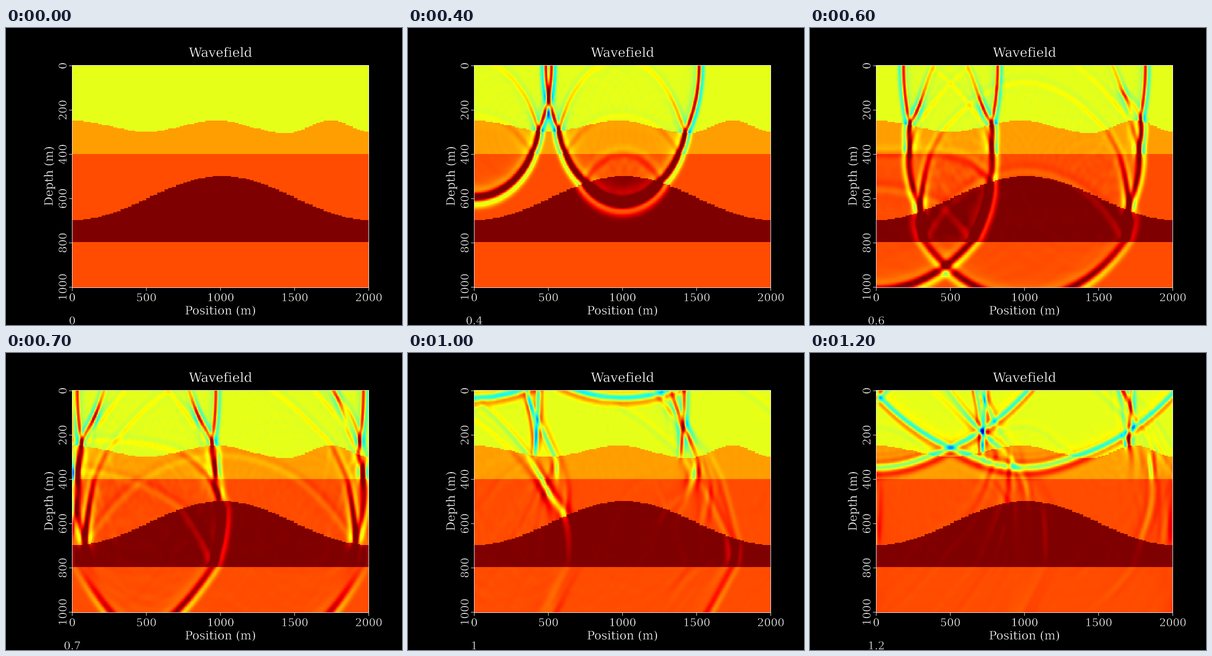
Recreate the animation shown at these times as a matplotlib script. Size 864x648 px, loop 1300 ms.

```python
import numpy as np
import matplotlib.pyplot as plt
from matplotlib.animation import FuncAnimation
from matplotlib.collections import LineCollection
from matplotlib.patheffects import Stroke

W, H, DPI = 864, 648, 100
PX = 72 / DPI
FRAMES, STEP_MS = 13, 100
LEFT, RIGHT, TOP, BOTTOM = 145, 791, 82, 566

# ---------- velocity model ----------
CELL, DT = 5.0, 0.001
NX, NZ = 401, 201
PAD_X, PAD_Z = 100, 140
COLUMN = 25  # width of a model column in metres


def wavy_depth(x):
    """First interface: half cosines between crests and troughs."""
    turns = [0, 490, 967, 1432, 1738, 2000]
    phase = np.pi * np.interp(x, turns, np.arange(6))
    trough = np.where((x > 967) & (x < 1738), 306, 300)
    return 250 + (trough - 250) * (1 - np.cos(phase)) / 2


def build_model():
    x = np.arange(NX) * CELL // COLUMN * COLUMN
    z = np.arange(NZ)[:, None] * CELL
    dome = 600 + 100 * np.cos(np.pi * x / 1000)
    v = np.full((NZ, NX), 1500.0)
    v[z >= wavy_depth(x) - CELL / 2] = 1800
    v[z[:, 0] >= 400] = 2000
    v[z >= dome - CELL / 2] = 2500
    v[z[:, 0] >= 800] = 2000
    return v


# ---------- wave equation ----------
def ricker(t, f=25.0, delay=0.05):
    a = (np.pi * f * (t - delay)) ** 2
    return (1 - 2 * a) * np.exp(-a)


def propagate(model):
    """Fourth-order acoustic modelling with two surface sources."""
    v = np.pad(model, ((PAD_Z, PAD_Z), (PAD_X, PAD_X)), mode="edge")
    c = ((v * DT / CELL) ** 2).astype(np.float32)[2:-2, 2:-2]
    now = np.zeros(v.shape, np.float32)
    old = np.zeros_like(now)
    lap = np.zeros_like(c)
    tmp = np.zeros_like(c)
    near, far = np.float32(4 / 3), np.float32(-1 / 12)
    sources = [PAD_X, PAD_X + NX // 2]
    every = round(STEP_MS / 1000 / DT)
    shots = []
    for n in range(every * (FRAMES - 1) + 1):
        if n % every == 0:
            shots.append(now[PAD_Z:PAD_Z + NZ, PAD_X:PAD_X + NX].copy())
        mid = now[2:-2, 2:-2]
        np.add(now[1:-3, 2:-2], now[3:-1, 2:-2], out=lap)
        lap += now[2:-2, 1:-3]
        lap += now[2:-2, 3:-1]
        lap *= near
        np.add(now[:-4, 2:-2], now[4:, 2:-2], out=tmp)
        tmp += now[2:-2, :-4]
        tmp += now[2:-2, 4:]
        tmp *= far
        lap += tmp
        np.multiply(mid, np.float32(5), out=tmp)
        lap -= tmp
        lap *= c
        lap += mid
        lap += mid
        inner = old[2:-2, 2:-2]
        np.subtract(lap, inner, out=inner)
        old[PAD_Z, sources] += ricker(n * DT)
        now, old = old, now
    return shots


def jet(x):
    x = np.clip(x, 0, 1)[..., None]
    return np.clip(1.5 - np.abs(4 * x - np.array([3, 2, 1])), 0, 1)


model = build_model()
shots = propagate(model)
gain = 0.33 / -shots[2].min()
images = [jet(model / 2500 + gain * s) for s in shots]

# ---------- figure ----------
fig = plt.figure(figsize=(W / DPI, H / DPI), dpi=DPI, facecolor="black")
ax = fig.add_axes([0, 0, 1, 1])
ax.axis("off")
picture = ax.imshow(images[0], extent=(LEFT, RIGHT, BOTTOM, TOP),
                    interpolation="nearest", aspect="auto")


def label(text, x, y, size=23.3, rotation=0):
    """Thin serif text centred on its baseline; size in pixels."""
    return ax.text(x, y, text, color="white", family="DejaVu Serif",
                   size=size * PX, ha="center", va="baseline",
                   rotation=rotation, rotation_mode="anchor",
                   path_effects=[Stroke(linewidth=0.5 * PX,
                                        foreground="black")])


label("Wavefield", 468, 63, 28)
label("Position (m)", 468, 625, 25.5)
label("Depth (m)", 102, 323, 25.5, 90)
clock = label("", 144.5, 646.5)

x0, x1, y0, y1 = LEFT - 0.5, RIGHT + 0.5, TOP - 0.5, BOTTOM + 0.5
rules = [[(x0, y0), (x1, y0), (x1, y1), (x0, y1), (x0, y0)]]
for i, x in enumerate(np.linspace(x0, x1, 5)):
    label(str(500 * i), x, 596)
    rules.append([(x, y1), (x, y1 + 7)])
for i, y in enumerate(np.linspace(TOP + 0.5, BOTTOM - 0.5, 6)):
    label(str(200 * i), 132, y, rotation=90)
    rules.append([(x0 - 7, y), (x0, y)])
frame = LineCollection(rules, colors="white", linewidths=PX)
frame.set_snap(False)
ax.add_collection(frame)
ax.set(xlim=(0, W), ylim=(H, 0))


def update(i):
    picture.set_data(images[i])
    clock.set_text(f"{i / 10:g}")
    return picture, clock


anim = FuncAnimation(fig, update, frames=FRAMES, interval=STEP_MS,
                     repeat=True, repeat_delay=0, blit=False)
plt.show()
```
